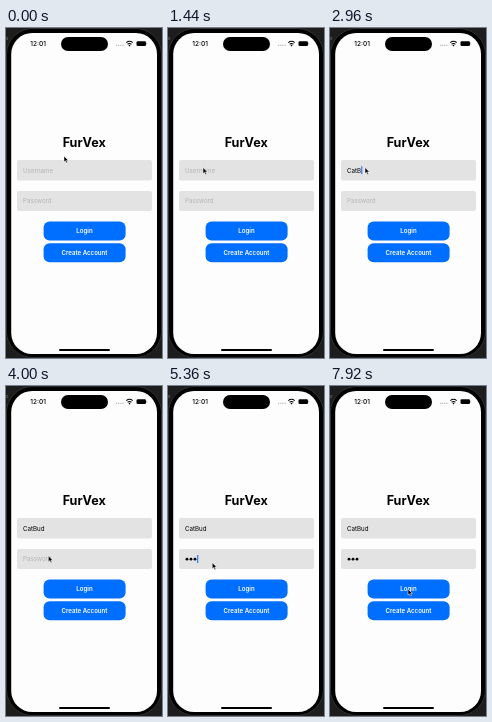
Recreate the animation shown at these times as an HTML page. Size 156x330 px, loop 8 s.

```html
<!DOCTYPE html>
<html lang="en">
<head>
<meta charset="utf-8">
<title>Login</title>
<style>
  html, body { margin: 0; width: 100%; height: 100%; overflow: hidden; background: #1d1d1d; }
  svg { display: block; width: 156px; height: 330px; font: 6.2px Inter, "Liberation Sans", sans-serif; }
  .hint { fill: #b4b4b7; }
  .label { fill: #fff; font-size: 6.1px; font-weight: 600; text-anchor: middle; }
</style>
</head>
<body>
<svg viewBox="0 0 156 330">
  <rect width="156" height="330" fill="#1d1d1d"/>
  <text y="12" font-size="4" fill="#888">o</text>
  <rect x=".5" y=".5" width="155" height="329" rx="26" stroke="#303030"/>
  <rect x="5.2" y="5" width="145.8" height="321" rx="21" fill="#fdfdfd"/>
  <rect x="55" y="9" width="47" height="14" rx="7"/>
  <text x="24.3" y="18.2" font-size="6.5" font-weight="500">12:01</text>
  <path d="M110 17.3h7.5" stroke="#aaa" stroke-dasharray="1.2 .9"/>
  <path d="M120.3 14.6q3.2-2.6 6.4 0M121.6 16.3q1.9-1.5 3.8 0" fill="none" stroke="#000" stroke-width="1.1"/>
  <circle cx="123.5" cy="17.6" r=".8"/>
  <rect x="130.5" y="13.2" width="9.5" height="4.8" rx="1.3"/>
  <path d="M140.7 14.8v1.6" stroke="#888" stroke-width=".7"/>

  <text x="78.2" y="118.8" font-size="12.6" font-weight="700" text-anchor="middle">FurVex</text>
  <g fill="#e3e3e3">
    <rect x="11" y="132" width="135" height="20.5" rx="2"/>
    <rect x="11" y="163" width="135" height="20" rx="2"/>
  </g>
  <text id="userHint" class="hint" x="17" y="144.6">Username</text>
  <text id="user" x="17" y="144.6"></text>
  <text id="passHint" class="hint" x="17" y="175.4">Password</text>
  <g id="dots">
    <circle cx="19" cy="173.2" r="1.4"/>
    <circle cx="23" cy="173.2" r="1.4"/>
    <circle cx="27" cy="173.2" r="1.4"/>
  </g>
  <rect id="caret" width="1.3" height="8" fill="#3d86f5"/>
  <g fill="#006fff">
    <rect x="37.6" y="193.5" width="82" height="19" rx="6"/>
    <rect x="37.6" y="215.3" width="82" height="19" rx="6"/>
  </g>
  <text class="label" x="78.5" y="205.3">Login</text>
  <text class="label" x="78.5" y="227.1">Create Account</text>
  <rect x="53" y="321" width="51" height="2" rx="1"/>
  <path id="mouse" d="M0 0v6.1l1.4-1.3 1 2.2 1.1-.5-1-2.1h1.9z" stroke="#fff" stroke-width=".5"/>
</svg>
<script>
const $ = id => document.getElementById(id);
const LOOP = 8000, NAME = "CatBud", BLINK = 800;
const USER_CLICK = 1600, TYPING = 2560, PASS_CLICK = 4160, IDLE = 6240;

const moves = [
  { from: 640, to: 1440, x: 35, y: 139.5 },
  { from: 3360, to: 4240, x: 44, y: 176.5 },
  { from: 5320, to: 6080, x: 75, y: 202.5 },
  { from: 7360, to: 7760, x: 78, y: 203 }
];

const ramp = (t, from, to) => Math.min(1, Math.max(0, (t - from) / (to - from)));
const smooth = k => k * k * (3 - 2 * k);
const typedBy = (t, start, step, max) =>
  Math.min(max, Math.max(0, Math.floor((t - start) / step) + 1));
const show = (el, on) => el.setAttribute("visibility", on ? "visible" : "hidden");

function mouseAt(t) {
  let x = 58, y = 128;
  for (const m of moves) {
    const k = smooth(ramp(t, m.from, m.to));
    x += (m.x - x) * k;
    y += (m.y - y) * k;
  }
  return [x, y];
}

// Steady while typing, otherwise fading out and back in.
function caretOpacity(t) {
  if (t < USER_CLICK || t > 7520) return 0;
  if (t > 3600 && t < PASS_CLICK) return 1 - ramp(t, 3600, 3760);
  if (t >= TYPING && t < IDLE) return 1;
  const age = t - (t < TYPING ? USER_CLICK : IDLE), p = age % BLINK;
  const tail = age >= BLINK ? ramp(p, -160, 80) : 1;
  return p < 240 ? tail : 1 - ramp(p, 240, 480) + ramp(p, 640, 880);
}

function draw(t) {
  const typed = typedBy(t, TYPING, 130, NAME.length);
  const dots = typedBy(t, 4560, 240, 3);
  const user = $("user");
  user.textContent = NAME.slice(0, typed);
  show($("userHint"), !typed);
  show($("passHint"), !dots);
  [...$("dots").children].forEach((dot, i) => show(dot, i < dots));

  const inPass = t >= PASS_CLICK, caret = $("caret");
  const offset = inPass ? dots * 4 : typed ? user.getComputedTextLength() : 0;
  caret.setAttribute("x", 17 + offset);
  caret.setAttribute("y", inPass ? 169 : 138.2);
  caret.setAttribute("opacity", caretOpacity(t));
  $("mouse").setAttribute("transform", `translate(${mouseAt(t)})`);
}

const start = performance.now();
function tick() {
  draw((performance.now() - start) % LOOP);
  requestAnimationFrame(tick);
}
tick();
</script>
</body>
</html>
```
